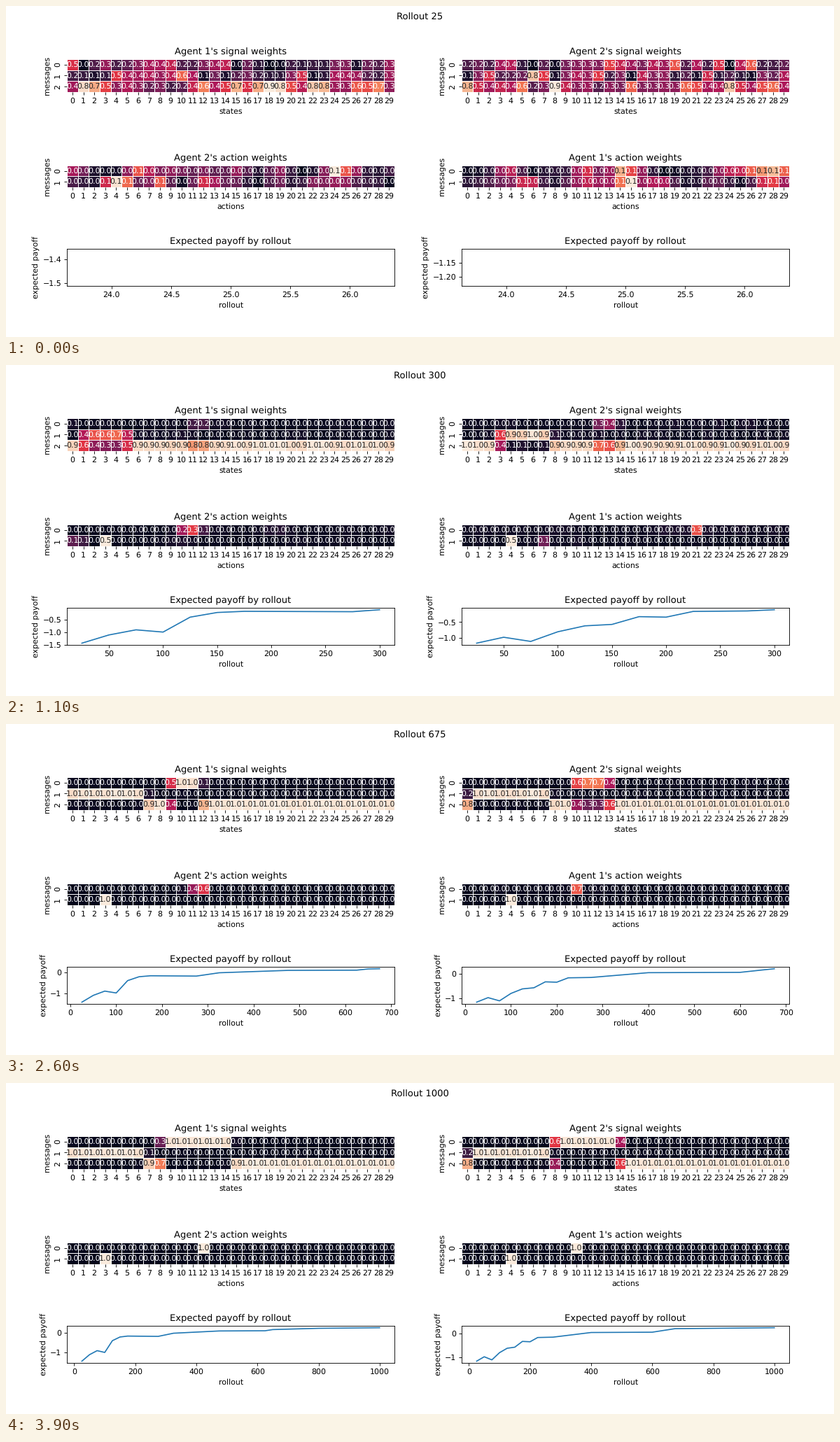
Recreate the animation shown at these times as a matplotlib script. Size 1183 px wide and 473 px high, loop 4 s.

```python
import numpy as np
import matplotlib.pyplot as plt
from matplotlib.animation import FuncAnimation
from matplotlib.colors import LinearSegmentedColormap

W, H = 1183, 473
DPI = W / 15
FRAMES, INTERVAL, STEP = 40, 100, 25
COLS = 30
LEFT, RIGHT, WIDTH = 87.1, 651.1, 468
CELL = WIDTH / COLS
STAGES = [25, 100, 200, 400, 550, 800, 1000]
STATES = np.arange(COLS)

plt.rcParams.update({"font.family": "DejaVu Sans", "text.hinting": "none"})
rocket = LinearSegmentedColormap.from_list("rocket", [
    "#03051a", "#35193e", "#701f57", "#ad1759",
    "#e13342", "#f37651", "#f6b48f", "#faebdd"])


class Signals:
    """Two messages claim a moving range of states, the third takes the rest."""

    def __init__(self, seed, *ranges):
        self.ranges = ranges
        rng = np.random.default_rng(seed)
        self.noise = rng.dirichlet([1.5, 1.5, 2], COLS).T

    def value(self, rollout):
        soft = np.interp(rollout, STAGES[:4], [.8, .5, .25, .15])
        doubt = np.interp(rollout, STAGES, [.75, .2, .1, .06, .04, .03, .02])
        claims = []
        for curve in self.ranges:
            mid, half, top = (np.interp(rollout, STAGES, c) for c in curve)
            edge = (np.abs(STATES - mid) - half) / soft
            claims.append(top / (1 + np.exp(edge)))
        rest = np.clip(1 - sum(claims), 0, 1)
        grid = np.array([*claims, rest])
        grid /= grid.sum(axis=0)
        return (1 - doubt) * grid + doubt * self.noise


class Actions:
    """Each message favours one action per stage; stages fade into each other."""

    def __init__(self, seed, *rows):
        rng = np.random.default_rng(seed)
        self.grids = []
        for stage in range(len(STAGES)):
            self.grids.append([self.profile(rng, *(c[stage] for c in row))
                               for row in rows])
        self.grids = np.array(self.grids)

    @staticmethod
    def profile(rng, mid, spread, share):
        peak = np.exp(-.5 * ((STATES - mid) / spread) ** 2)
        noise = np.convolve(rng.gamma(.8, size=COLS), [.5, 1, .5], "same")
        return share * peak / peak.sum() + (1 - share) * noise / noise.sum()

    def value(self, rollout):
        pos = np.interp(rollout, STAGES, range(len(STAGES)))
        i = min(int(pos), len(STAGES) - 2)
        t = pos - i
        return (1 - t) * self.grids[i] + t * self.grids[i + 1]


# per message: centre, half width and strength at each stage
signals1 = Signals(
    3,
    ([7, 12, 13, 10, 10, 10.7, 11.35], [2.3, 1.3, .5, .3, .5, 2.25, 3.2],
     [1, .9, .8, .1, 1, 1, 1]),
    ([25, 7, 4, 2, 3, 3, 3], [1.2, 3, .5, 3.8, 3.6, 3.6, 3.6],
     [1, .7, .35, 1, 1, 1, 1]))
signals2 = Signals(
    8,
    ([14, 10.5, 11, 14.5, 11.5, 11.3, 10.95], [3, 1.3, .5, 1.6, .8, 2.5, 3],
     [.9, .95, .65, .08, .45, 1, 1]),
    ([4, 6.8, 6.6, 3.9, 3.9, 3.9, 3.9], [3, 1.6, .9, 3.8, 3.65, 3.65, 3.65],
     [.7, .7, .95, 1, 1, 1, 1]))

# per message: favoured action, spread and share at each stage
actions2 = Actions(
    5,
    ([24, 6, 10.5, 11, 11, 12, 12], [.6, .5, .5, .8, .5, .2, .2],
     [.1, .4, .45, .7, .95, 1, 1]),
    ([8, 23, .4, 3, 3, 3, 3], [.7, 1.1, .5, .2, .2, .2, .2],
     [.1, .7, .4, 1, 1, 1, 1]))
actions1 = Actions(
    12,
    ([14, 11.4, 21, 21, 10, 10, 10], [.7, .6, .4, .3, .4, .2, .2],
     [.1, .4, .25, .35, .3, 1, 1]),
    ([15, 7, 7, 4, 4, 4, 4], [.6, .9, .4, .2, .2, .2, .2],
     [.1, .5, .25, 1, 1, 1, 1]))

# key points of the payoff curves, straight in between
rollouts = STEP * np.arange(1, FRAMES + 1)
payoff1 = np.interp(
    rollouts,
    [25, 50, 75, 100, 125, 150, 175, 275, 325, 475, 625, 650, 800, 1000],
    [-1.434, -1.105, -.9, -.99, -.393, -.206, -.16, -.175, -.015, .1, .11,
     .17, .235, .265])
payoff2 = np.interp(
    rollouts,
    [25, 50, 75, 100, 125, 150, 175, 200, 225, 275, 400, 600, 675, 1000],
    [-1.167, -.98, -1.112, -.807, -.62, -.575, -.33, -.345, -.165, -.15,
     .047, .06, .21, .25])

# a hair over the pixel size so that float rounding never loses a pixel
fig = plt.figure(figsize=((W + 1e-6) / DPI, (H + 1e-6) / DPI), dpi=DPI,
                 facecolor="white")
heading = fig.suptitle("Rollout 25")


def add_axes(x, top, height):
    return fig.add_axes([x / W, 1 - (top + height) / H, WIDTH / W, height / H])


def luminance(rgba):
    rgb = rgba[:, :3]
    lin = np.where(rgb <= .03928, rgb / 12.92, ((rgb + .055) / 1.055) ** 2.4)
    return lin @ np.array([.2126, .7152, .0722])


class Heatmap:
    def __init__(self, x, top, weights, title, xlabel):
        self.weights = weights
        rows = len(weights.value(STEP))
        ax = add_axes(x, top, rows * CELL)
        self.mesh = ax.pcolormesh(np.zeros((rows, COLS)), cmap=rocket,
                                  edgecolors="white", linewidth=.5)
        ax.set(xlim=(0, COLS), ylim=(rows, 0), title=title,
               xlabel=xlabel, ylabel="messages")
        ax.spines[:].set_visible(False)
        ax.set_xticks(STATES + .5, range(COLS))
        ax.set_yticks(np.arange(rows) + .5, range(rows),
                      rotation="vertical", va="center")
        self.notes = [ax.text(c + .5, r + .5, "", ha="center", va="center")
                      for r in range(rows) for c in range(COLS)]

    def update(self, rollout):
        grid = self.weights.value(rollout)
        self.mesh.set_array(grid)
        self.mesh.set_clim(grid.min(), grid.max())
        flat = grid.ravel()
        lum = luminance(rocket(self.mesh.norm(flat)))
        for note, val, light in zip(self.notes, flat, lum):
            note.set_text(f"{val:.1f}")
            note.set_color(".15" if light > .408 else "w")


class Payoff:
    def __init__(self, x, data):
        self.data = data
        self.ax = add_axes(x, 347.3, 52.6)
        self.line, = self.ax.plot([], [], color="#1f77b4")
        self.ax.set(title="Expected payoff by rollout", xlabel="rollout",
                    ylabel="expected payoff")

    def update(self, count):
        self.line.set_data(rollouts[:count], self.data[:count])
        self.ax.relim()
        self.ax.autoscale_view()


maps = [
    Heatmap(LEFT, 76, signals1, "Agent 1's signal weights", "states"),
    Heatmap(RIGHT, 76, signals2, "Agent 2's signal weights", "states"),
    Heatmap(LEFT, 227.8, actions2, "Agent 2's action weights", "actions"),
    Heatmap(RIGHT, 227.8, actions1, "Agent 1's action weights", "actions"),
]
charts = [Payoff(LEFT, payoff1), Payoff(RIGHT, payoff2)]


def update(i):
    rollout = STEP * (i + 1)
    heading.set_text(f"Rollout {rollout}")
    for heatmap in maps:
        heatmap.update(rollout)
    for chart in charts:
        chart.update(i + 1)
    return []


anim = FuncAnimation(fig, update, frames=FRAMES, interval=INTERVAL,
                     init_func=lambda: [], repeat=True, repeat_delay=0,
                     blit=False)
plt.show()
```
